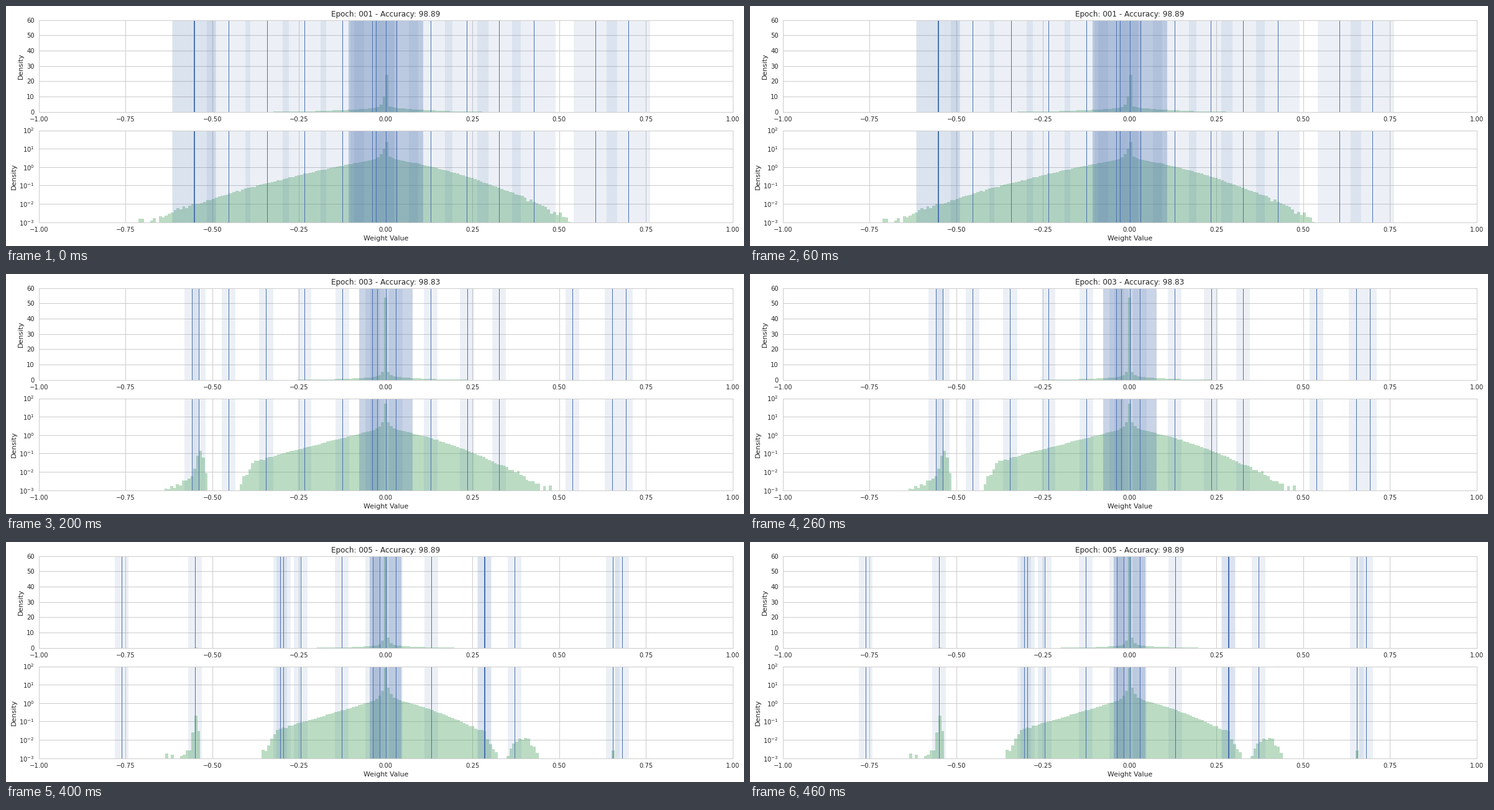
A matplotlib script that plays this animation: 1187 by 387 pixels, repeating every 0.5 s.

```python
import numpy as np
import matplotlib.pyplot as plt
from matplotlib.animation import FuncAnimation

W, H, DPI = 1187, 387, 72
BLUE, GREEN, INK, GRID = "#4C72B0", "#55A868", ".15", ".8"
BINS = np.arange(-90, 91)

plt.rcParams.update({
    "font.family": "DejaVu Sans", "font.size": 10,
    "text.color": INK, "axes.labelcolor": INK,
    "axes.titlesize": 12, "axes.labelsize": 11,
    "axes.edgecolor": GRID, "axes.linewidth": 1, "axes.axisbelow": True,
    "grid.color": GRID, "grid.linewidth": 1, "grid.linestyle": "-",
    "xtick.color": INK, "ytick.color": INK,
    "xtick.major.size": 0, "ytick.major.size": 0,
    "xtick.minor.size": 0, "ytick.minor.size": 0,
    "xtick.major.pad": 7, "ytick.major.pad": 7,
})

# Mixture means: {epoch: weight} key points, linear in between.
TRACKS = [
    {0: -.553, 2: -.559, 3: -.5445, 4: -.55},
    {0: -.5515, 1: -.532, 2: -.539, 3: -.693, 4: -.761},
    {2: -.453, 3: -.4155, 4: -.304},
    {0: -.342, 2: -.345, 3: -.4155, 4: -.295},
    {2: -.2345, 4: -.245},
    {3: -.125, 4: -.127},
    {0: -.039, 4: -.038},
    {0: -.028, 1: -.0245, 2: -.0245, 3: -.0195, 4: -.0175},
    {0: 0},
    {1: .031, 2: .029},
    {3: .1295, 4: .131},
    {0: .2335, 3: .235, 4: .2835},
    {2: .3265, 3: .337, 4: .2855},
    {0: .427, 1: .432, 2: .538, 3: .4055, 4: .3715},
    {0: .6045, 1: .651, 4: .6545},
    {0: .699, 1: .69, 2: .692, 4: .6815},
]

# grid: bin origin and width; cut: where each flank breaks off;
# peak: extra left of zero, zero bin, extra right of zero;
# bumps: (centre, log10 height, sigma), the first one drags a left tail.
EPOCHS = [
    dict(acc=98.89, grid=(-.001, .00848), cut=(1, 1), peak=(7, 24.3, .65),
         bumps=[]),
    dict(acc=98.88, grid=(-.0032, .00839), cut=(.425, 1),
         peak=(2.9, 42.5, 1.25), bumps=[(-.525, -1.45, .022)]),
    dict(acc=98.83, grid=(-.005, .00833), cut=(.383, 1),
         peak=(2.8, 53.5, 2.6), bumps=[(-.534, -.9, .0075)]),
    dict(acc=98.83, grid=(-.0068, .00832), cut=(.358, 1),
         peak=(2.6, 63, 5.5),
         bumps=[(-.5425, -.8, .006), (.435, -2.3, .02), (.653, -2.75, .004)]),
    dict(acc=98.89, grid=(-.005, .00841), cut=(.315, .285),
         peak=(2.9, 80, 4.9),
         bumps=[(-.547, -.66, .004), (.395, -1.85, .019),
                (.653, -2.75, .004)]),
]


def means_at(k):
    return [np.interp(k, list(t), list(t.values())) for t in TRACKS]


def histogram(k):
    e = EPOCHS[k]
    origin, width = e["grid"]
    x = origin + width * (BINS + .5)
    r, neg = np.abs(x), x < 0

    # Log-quadratic flanks that steepen as training goes on.
    slope = np.where(neg, 3.2 + .62 * k, 2.9 + .25 * k)
    curve = np.where(neg, 2.6 - .65 * k, 6.5 + .9 * k)
    over = np.maximum(r - np.where(neg, *e["cut"]), 0)
    dens = 10 ** (.52 - .05 * k - slope * r - curve * r ** 2 - 30 * over)

    for c, level, s in e["bumps"]:
        dens += 10 ** level * np.exp(-((x - c) / s) ** 2 / 2)
    if e["bumps"]:
        d = e["bumps"][0][0] - x
        dens += np.where(d > 0, 10 ** (-1.8 - .15 * k - 9 * d), 0)

    left, centre, right = e["peak"]
    dens += np.where(BINS < 0, left, right) * .28 ** (np.abs(BINS) - 1.0)
    dens[BINS == 0] = centre

    # Counting noise grows as bins get emptier.
    noise = np.random.default_rng(k).normal(size=x.size)
    dens *= 10 ** (.006 * noise / np.sqrt(np.maximum(dens, 1e-3)))
    return dens, origin + width * np.append(BINS, BINS[-1] + 1)


fig = plt.figure(figsize=(W / DPI, H / DPI), dpi=DPI, facecolor="white")


def make_axes(bottom, pad):
    ax = fig.add_axes([52.8 / W, bottom / H, 1116 / W, 148.25 / H])
    ax.set_xticks(np.linspace(-1, 1, 9))
    ax.set_ylabel("Density", labelpad=pad)
    ax.grid(True)
    return ax


top = make_axes(216.12, 4)
low = make_axes(38.22, 3)
low.set_yscale("log")
low.set_xlabel("Weight Value")
title = top.set_title("")
drawn = []


def draw(i):
    while drawn:
        drawn.pop().remove()
    k = i % len(EPOCHS)
    title.set_text(f"Epoch: {k + 1:03d} - Accuracy: {EPOCHS[k]['acc']:.2f}")
    dens, edges = histogram(k)
    spread = .0203 + .0422 * .06 ** k
    zero_spread = .108 - .0155 * k
    for ax, base in ((top, 0), (low, 1e-4)):
        drawn.append(ax.stairs(dens, edges, baseline=base, fill=True,
                               color=GREEN, alpha=.4, lw=0))
        for m in means_at(k):
            half, alpha = (spread, .1) if m else (zero_spread, .3)
            drawn.append(ax.axvspan(m - half, m + half, color=BLUE,
                                    alpha=alpha, lw=0))
            drawn.append(ax.axvline(m, color=BLUE, lw=1))
        ax.set_xlim(-1, 1)
    top.set_ylim(0, 60)
    low.set_ylim(1e-3, 1e2)
    return drawn


anim = FuncAnimation(fig, draw, frames=len(EPOCHS), interval=100,
                     repeat=True, repeat_delay=0, blit=False)
plt.show()
```
